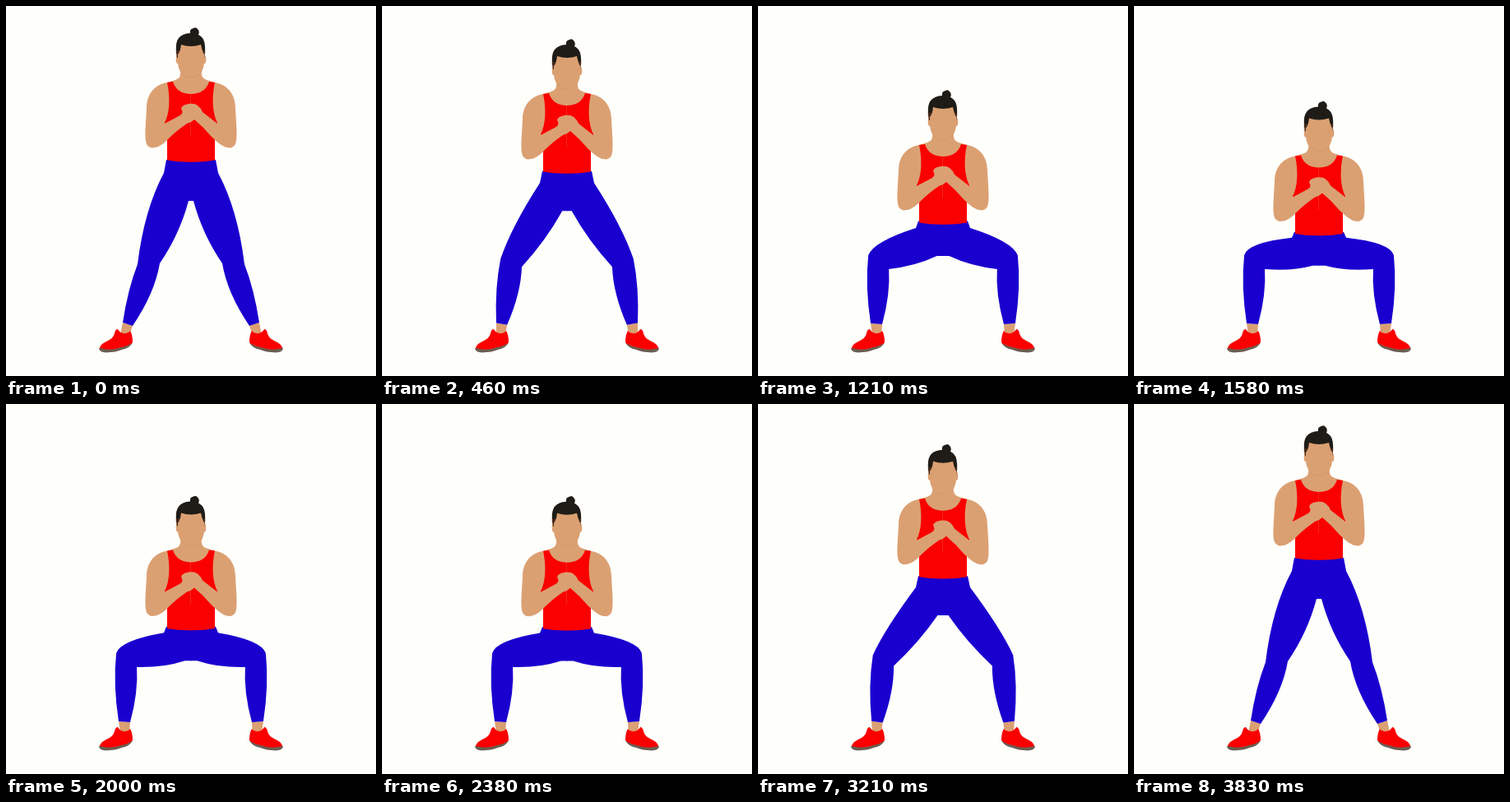
An HTML page that plays this animation: 450 px wide and 450 px high, repeating every 3.87 s.

```html
<!DOCTYPE html>
<html lang="en">
<head>
<meta charset="utf-8">
<title>Sumo squat</title>
<style>
  html, body { margin: 0; width: 100%; height: 100%; overflow: hidden; background: #fefefb; }
  svg { display: block; width: 100vw; height: 100vh; }
  .skin { fill: #dba072; }
  .top { fill: #fa0000; }
  .pants { fill: #1a00cf; }
  .hair { fill: #1f1c17; }
  .side { fill: #46291a; }
  .sole { fill: #6c5c50; }
</style>
</head>
<body>
<svg viewBox="0 0 450 450">
  <defs>
    <g id="leg">
      <path class="skin" id="ankle"/>
      <path class="sole" d="M113 416Q113 421 122 421.500Q134 421 141 418Q151 416 154 409Z"/>
      <path class="top" d="M114 416Q115 411 122 408Q131 404 132 398Q133 393 136 393Q139 399 146 398Q149 398 151 395Q154 400 154 409Q150 413 140 415Q128 420 114 416Z"/>
      <path class="pants" id="trouser"/>
    </g>
    <g id="side">
      <path class="skin" d="M225.500 76H212Q214 88 206 90L196 93C179 96 171 109 171 124C170 145 168 160 171 168Q175 175 184 171L200 158H225.500Z"/>
      <path class="top" d="M196 93L203 92C206 102 214 107 225.500 107V189.700Q210 190 196 187.500V158L193 142C199 130 200 112 196 93Z"/>
      <ellipse class="skin" cx="208.500" cy="65" rx="1.800" ry="5"/>
    </g>
  </defs>
  <use href="#leg"/>
  <use href="#leg" transform="matrix(-1 0 0 1 450 0)"/>
  <g id="body">
    <use href="#side"/>
    <use href="#side" transform="matrix(-1 0 0 1 450 0)"/>
    <path class="skin" d="M176 150L193 143L210 134Q216 131 214 127Q211 123 218 120Q228 117 233 121Q237 124 239 129L257 143L274 150Q277 172 268 172Q261 170 250 159Q240 147 229 138Q225 142 220 143Q207 152 198 161Q190 170 182 172Q172 170 176 150Z"/>
    <path class="side" d="M207 49H242Q243 56 241 63H208Q206 56 207 49Z"/>
    <path class="hair" d="M207 54Q205 34 224 33Q223 28 228 27Q231 25 233 28Q236 31 234 35Q243 39 242 54Z"/>
    <path class="skin" d="M213 47Q225 51 237 47Q239 56 241 59V70Q239 86 225 87Q211 86 209 70V59Q212 56 213 47Z"/>
    <path d="M212 79Q217 87 225 87Q233 87 238 79" fill="none" stroke="#d0915c" stroke-width=".6"/>
  </g>
</svg>
<script>
  const FRAME = 1000 / 24, LOOP = 3870;
  const DEPTH = 90, PULSE = 8;
  const LOWERED = 40, RISE = 51, STOOD = 91;

  const $ = id => document.getElementById(id);

  function ease(p) {
    const a = p ** 1.75, b = (1 - p) ** 1.75;
    return a / (a + b);
  }

  function depthAt(frame) {
    if (frame <= LOWERED) return DEPTH * ease(frame / LOWERED);
    if (frame >= RISE) return DEPTH * ease(Math.max(0, (STOOD - frame) / (STOOD - RISE)));
    return DEPTH - PULSE * Math.sin(Math.PI * (frame - LOWERED) / (RISE - LOWERED)) ** 2;
  }

  // The knees swing outwards early in the squat; the hips sink throughout it.
  function drawLeg(depth) {
    const swing = 1 - Math.exp(-depth / 15);
    const point = (x, y, swingX, swingY, sink = 0) =>
      `${(x + swingX * swing).toFixed(2)} ${(y + swingY * swing + sink * depth).toFixed(2)} `;

    const waist = point(195, 187, 0, 0, .98);
    const hip = point(192, 203, 0, 0, .88);
    const thighOut = point(168 - .2 * depth, 248, -12, 30, .11);
    const kneeOut = point(160, 314, -26, -11);
    const calfOut = point(148, 345, -18, -4);
    const cuffOut = point(142, 385, -5, 1);
    const cuffIn = point(154, 389, -3, -2);
    const calfIn = point(181, 349, -20, 1);
    const kneeIn = point(187, 313, -28, 7);
    const thighIn = point(211, 278, -19, 0, .5);
    const crotch = point(222, 237, -4.5, 0, .88);

    $("trouser").setAttribute("d",
      `M${waist}L${hip}Q${thighOut}${kneeOut}Q${calfOut}${cuffOut}L${cuffIn}` +
      `Q${calfIn}${kneeIn}Q${thighIn}${crotch}H225.500V${187 + .98 * depth}Z`);
    $("ankle").setAttribute("d", `M${cuffOut}L${cuffIn}L150 400H139Z`);
  }

  function draw(now) {
    const depth = depthAt(Math.floor((now % LOOP + 5) / FRAME));
    $("body").setAttribute("transform", `translate(0 ${depth.toFixed(2)})`);
    drawLeg(depth);
    requestAnimationFrame(() => draw(performance.now() - start));
  }

  const start = performance.now();
  draw(0);
</script>
</body>
</html>
```
